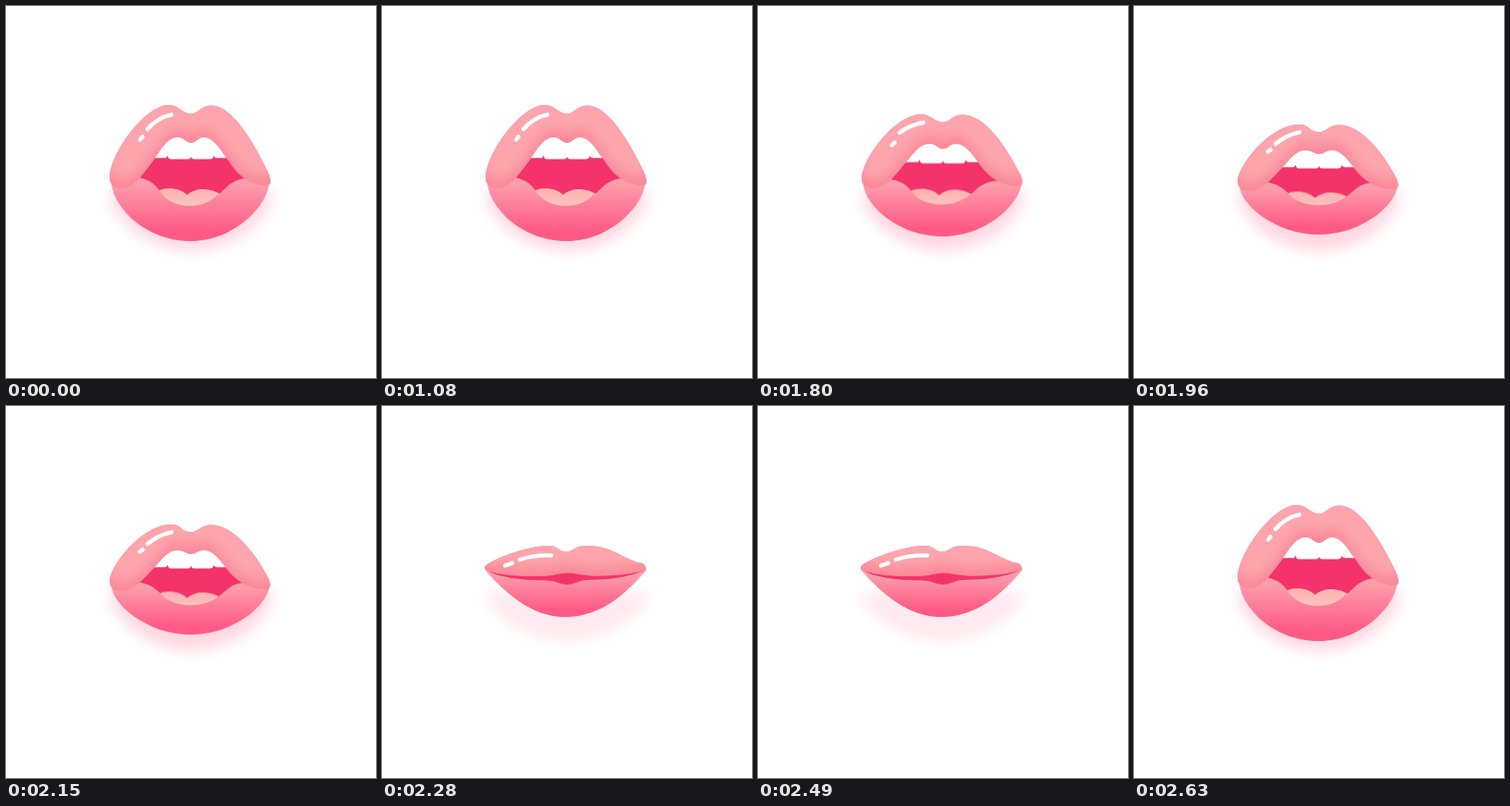
These frames come from a looping animation (400 by 402 pixels, 2.83 s). An HTML page:

```html
<!DOCTYPE html>
<html lang="en">
<head>
<meta charset="utf-8">
<title>Talking lips</title>
<style>
html, body { margin: 0; width: 100%; height: 100%; overflow: hidden; background: #fff; }
svg { display: block; width: 100%; height: 100%; }

/* Poses are held and swapped hard: wide, half, low, closed, wide */
.upper, .lower, .mouth, .shine, .teeth, .tongue, .glow { animation: 2830ms step-end infinite; }
.upper { animation-name: upper; }
.lower { animation-name: lower; }
.mouth { animation-name: mouth; }
.shine { animation-name: shine; }
.teeth { animation-name: teeth; }
.tongue { animation-name: tongue; }
.glow { animation-name: glow; transform-origin: 200px 200px; }

@keyframes upper {
  0%, 92.933%, 100% { d: path("M112 186C112 160 150 107 176 107C188 107 190 116.5 200 116.5C208 116.5 210 107.5 222 107.5C246 107.5 270 152 284 181C287 188 287 194 282 194C262 193 251 183 241 168C231 154 224 142 214 142C207 142 206 148 200 148C194 148 193 142 186 142C174 142 168 155 160 166C148 182 139 197 124 197C116 197 112 192 112 186Z"); }
  63.604% { d: path("M112 187C112 166 148 117 176 117C188 117 190 125.5 200 125.5C208 125.5 210 117.5 222 117.5C246 117.5 270 155 283 181C287 188 287 195 282 195C262 194 251 186 241 173C231 159 224 149 214 149C207 149 206 154.5 200 154.5C194 154.5 193 149 186 149C174 149 168 160 160 169C148 183 139 197 124 197C116 197 112 193 112 187Z"); }
  69.258% { d: path("M112 190C112 172 148 128 178 128C190 128 189 136 200 136C209 136 210 128.5 222 128.5C246 128.5 270 160 282 183C287 191 287 198 282 198C262 198 251 190 241 179C231 166 224 156 214 156C207 156 206 160 200 160C194 160 193 156 186 156C174 156 168 167 160 175C148 187 139 200 124 200C116 200 112 196 112 190Z"); }
  80.565% { d: path("M111 174C112 169 153 151 181 151C190 151 191 157.5 199 157.5C207 157.5 207 151 222 151C250 151 262 167 280 169.5C285 171 287 177 284 178C268 182 245 184.5 225 183.5C213 182.5 209 180.5 200 180.5C191 180.5 188 183.5 172 184C148 184.5 128 183 113 178C111 177 111 176 111 174Z"); }
}
@keyframes lower {
  0%, 92.933%, 100% { d: path("M114 190C114 213 147 254 200 254C248 254 284 214 284.5 190L262 186C243 186.5 238 198 228 205C213 219 186 220 171 206C163 197 160 186 138 185Z"); }
  63.604% { d: path("M114 192C114 212 149 249 200 249C248 249 284 212 284.5 192L258 189C240 190 236 200 228 205C213 217 186 218 171 206C163 196 156 187 138 187Z"); }
  69.258% { d: path("M114 195C116 215 153 247 200 247C246 247 283 215 284.5 195L258 191C240 192 236 203 228 207C213 218 186 218 171 207C163 198 155 190 136 190Z"); }
  80.565% { d: path("M111 177C134 203 163 228 198 228C236 228 263 204 286 177C262 187 240 187.5 222 188C212 188.5 208 193 200 193C192 193 190 189 178 188.5C150 188.5 128 185.5 111 177Z"); }
}
@keyframes mouth {
  0%, 92.933%, 100% { d: path("M125 190Q165 130 200 130Q235 130 272 190L230 225H170Z"); }
  63.604% { d: path("M125 190Q165 140 200 140Q235 140 272 190L230 225H170Z"); }
  69.258% { d: path("M125 193Q165 148 200 148Q235 148 272 193L230 225H170Z"); }
  80.565% { d: path("M112 177Q200 170 285 177Q250 200 200 200Q150 200 112 177Z"); }
}
@keyframes shine {
  0%, 92.933%, 100% { d: path("M145 144.5L147.5 141.3M153 133Q164 120.5 179 117.3"); }
  63.604% { d: path("M144.7 150.5L147.7 147.5M153 137Q164 128.5 179 126"); }
  69.258% { d: path("M144.7 157.5L147.7 155.2M153 149Q165 139 179 136.3"); }
  80.565% { d: path("M133 172.5L141 169.7M149 166Q165 160.5 183 161.5"); }
}
@keyframes teeth {
  0%, 92.933%, 100% { transform: none; visibility: visible; }
  63.604% { transform: translateY(4.5px); visibility: visible; }
  69.258% { transform: translateY(10px); visibility: visible; }
  80.565% { transform: none; visibility: hidden; }
}
@keyframes tongue {
  0%, 92.933%, 100% { transform: none; visibility: visible; }
  63.604% { transform: translateY(.5px); visibility: visible; }
  69.258% { transform: translateY(3.5px); visibility: visible; }
  80.565% { transform: none; visibility: hidden; }
}
@keyframes glow {
  0%, 63.604%, 69.258%, 92.933%, 100% { opacity: .27; transform: none; }
  80.565% { opacity: .14; transform: scaleY(.84); }
}
</style>
</head>
<body>
<svg viewBox="0 0 400 402">
  <defs>
    <linearGradient id="lowerFill" x2="0" y2="1">
      <stop offset=".1" stop-color="#fe9dab"/>
      <stop offset=".85" stop-color="#ff5a85"/>
    </linearGradient>
    <linearGradient id="tongueFill" x2="0" y2="1">
      <stop offset="0" stop-color="#fdb2b1"/>
      <stop offset="1" stop-color="#fcc6c3"/>
    </linearGradient>
    <filter id="soft" x="-20%" y="-40%" width="140%" height="180%"><feGaussianBlur stdDeviation="6.5"/></filter>
    <filter id="haze" x="-20%" y="-60%" width="140%" height="220%"><feGaussianBlur stdDeviation="8"/></filter>
    <clipPath id="upperClip"><path class="upper"/></clipPath>
  </defs>

  <path class="glow" fill="#ff6a90" filter="url(#haze)" d="M112 200C112 226 150 264 200 264S288 226 288 200Z"/>

  <path class="mouth" fill="#f4336b"/>
  <path class="teeth" fill="#fff" d="M150 140H250V164.3H228Q225.3 164.3 224.7 161.5Q224 165.5 221 165.5H203Q200.5 165.5 200 162.5Q199.5 165.5 197 165.5H178Q175.3 165.5 174.8 161.5Q174 164.3 171.5 164.3H150Z"/>
  <path class="tongue" fill="url(#tongueFill)" d="M164 200C172 195 188 196 196 204C206 195 222 197 233 204V218H164Z"/>
  <path class="lower" fill="url(#lowerFill)"/>

  <path class="upper" fill="#fa8998"/>
  <g clip-path="url(#upperClip)">
    <g transform="translate(0 -11)" filter="url(#soft)">
      <path class="upper" fill="#fda5ad" stroke="#fda5ad" stroke-width="3"/>
    </g>
  </g>
  <path class="shine" fill="none" stroke="#fff" stroke-width="4.4" stroke-linecap="round"/>
</svg>
</body>
</html>
```
